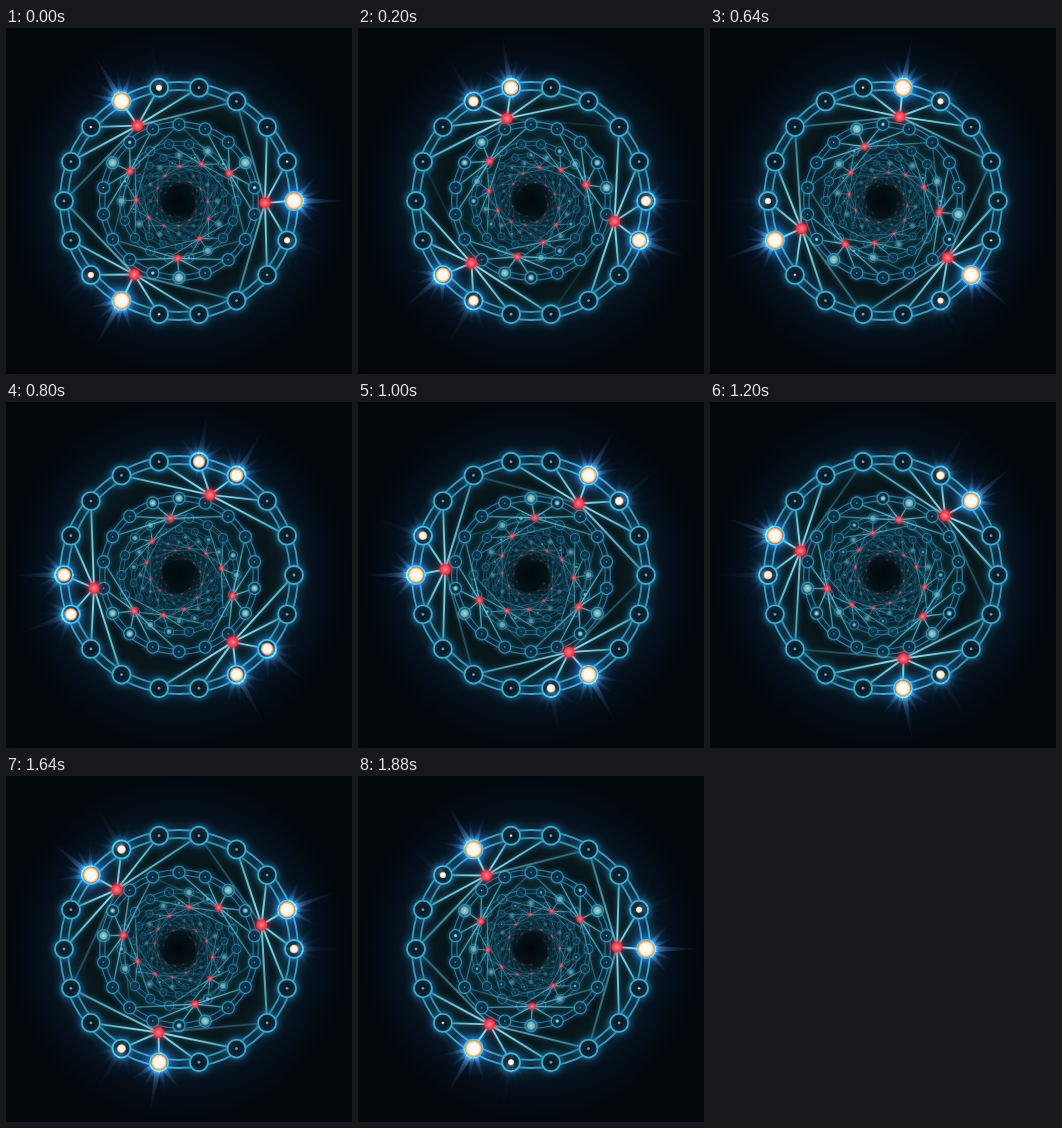
An HTML page with a canvas that plays this animation: 346x346 px, repeating every 1.92 s.

```html
<!DOCTYPE html>
<html lang="en">
<head>
<meta charset="utf-8">
<title>Ring tunnel</title>
<style>
html, body { margin: 0; width: 100%; height: 100%; overflow: hidden; background: #02070b; }
canvas { display: block; width: 100vw; height: 100vh; }
</style>
</head>
<body>
<canvas id="stage" width="346" height="346"></canvas>
<script>
const SIZE = 346, LOOP = 1920, STEP = 40, DEG = Math.PI / 180;
const LEVELS = 10, NODES = 18, RING = 115, HUB = 86;
const ctx = document.getElementById('stage').getContext('2d');

const clamp = v => Math.max(0, Math.min(1, v));
const polar = (r, deg) => [r * Math.cos(deg * DEG), r * Math.sin(deg * DEG)];
// Shortest angular distance to any of the three hubs.
const gap = (a, b) => { const d = (((a - b) % 360) + 360) % 360; return Math.min(d, 360 - d); };

function glow(color, blur) {
  ctx.shadowColor = color;
  ctx.shadowBlur = blur;
}

function disc(x, y, r, fill) {
  ctx.beginPath();
  ctx.arc(x, y, r, 0, 2 * Math.PI);
  ctx.fillStyle = fill;
  ctx.fill();
}

function circle(x, y, r, width, color) {
  ctx.beginPath();
  ctx.arc(x, y, r, 0, 2 * Math.PI);
  ctx.lineWidth = width;
  ctx.strokeStyle = color;
  ctx.stroke();
}

function radial(x, y, r, ...stops) {
  const g = ctx.createRadialGradient(x, y, 0, x, y, r);
  stops.forEach(([at, color]) => g.addColorStop(at, color));
  return g;
}

function spokes(hubs, scale) {
  const base = ctx.globalAlpha;
  ctx.lineWidth = 1.9;
  glow('#1684a8', 5 * scale);
  for (const hub of hubs) {
    const [hx, hy] = polar(HUB, hub);
    for (let i = 0; i < NODES; i++) {
      const angle = i * 20, fade = clamp((68 - gap(angle, hub)) / 14);
      if (!fade) continue;
      const [x, y] = polar(RING, angle);
      const g = ctx.createLinearGradient(hx, hy, x, y);
      g.addColorStop(0, '#a4e2e8');
      g.addColorStop(1, '#489fb1');
      ctx.globalAlpha = base * fade;
      ctx.strokeStyle = g;
      ctx.beginPath();
      ctx.moveTo(hx, hy);
      ctx.lineTo(x, y);
      ctx.stroke();
    }
  }
  ctx.globalAlpha = base;
}

function flare(x, y, angle, power) {
  ctx.save();
  ctx.globalCompositeOperation = 'lighter';
  ctx.translate(x, y);
  disc(0, 0, 30, radial(0, 0, 30, [0, `rgba(70,150,235,${.65 * power})`],
    [.4, `rgba(28,80,150,${.4 * power})`], [1, 'rgba(0,10,40,0)']));
  ctx.rotate(angle * DEG);
  for (const [turn, length, width] of [[0, 58, 3.5], [-48, 38, 3], [48, 38, 3], [-22, 34, 3], [22, 34, 3], [180, 24, 2]]) {
    ctx.save();
    ctx.rotate(turn * DEG);
    ctx.fillStyle = radial(0, 0, length, [0, `rgba(150,190,220,${.6 * power})`],
      [.4, `rgba(65,105,145,${.35 * power})`], [1, 'rgba(10,25,50,0)']);
    ctx.beginPath();
    ctx.moveTo(0, -width);
    ctx.lineTo(length, 0);
    ctx.lineTo(0, width);
    ctx.fill();
    ctx.restore();
  }
  ctx.restore();
}

function node(angle, power, level, scale) {
  const [x, y] = polar(RING, angle);
  glow('#1478b8', 7 * scale);
  disc(x, y, 9, '#03131c');
  circle(x, y, 9, 1.8, '#49a9bd');
  glow('transparent', 0);
  disc(x, y, 1.4, '#7f979b');
  if (!power) return;
  if (!level) flare(x, y, angle, power);
  const r = 10 * Math.sqrt(power);
  disc(x, y, r, level
    ? radial(x, y, r, [0, '#e0ffff'], [.5, '#9cecf2'], [1, 'rgba(50,170,190,0)'])
    : radial(x, y, r, [0, '#ffffff'], [.6, '#fff5e4'], [.8, '#e9ae78'], [1, 'rgba(150,80,40,0)']));
}

function layer(level, phase) {
  const scale = 2 / (level + 2);
  const hubs = [0, 120, 240].map(a => a + phase);
  ctx.save();
  ctx.rotate(-30 * level * DEG);
  ctx.scale(scale, scale);
  ctx.globalAlpha = level ? .72 * .78 ** (level - 1) : 1;
  glow('#1670c0', 8 * scale);
  circle(0, 0, 119, 1.8, '#3f9fb4');
  circle(0, 0, 111, 1.8, '#3a93a5');
  spokes(hubs, scale);
  for (let i = 0; i < NODES; i++) {
    const near = Math.min(...hubs.map(h => gap(i * 20, h)));
    node(i * 20, clamp(1 - near / 21.5), level, scale);
  }
  glow('#ff2038', 6 * scale);
  for (const hub of hubs) {
    const [x, y] = polar(HUB, hub);
    disc(x, y, 5.5, radial(x, y, 5.5, [0, '#ff929c'], [.5, '#ff4c5c'], [1, '#d82f42']));
  }
  ctx.restore();
}

function draw(time) {
  ctx.fillStyle = '#02070b';
  ctx.fillRect(0, 0, SIZE, SIZE);
  ctx.save();
  ctx.translate(173, 173);
  disc(0, 0, 170, radial(0, 0, 170, [0, '#02080c'], [.12, '#04141a'], [.35, '#0a252b'],
    [.5, '#071419'], [.68, '#0b1d22'], [.8, '#04101c'], [1, '#02070b']));
  for (let level = LEVELS - 1; level >= 0; level--) layer(level, (time + STEP / 2) / LOOP * 120);
  ctx.restore();
}

const start = performance.now();
let shown = -1;
function tick() {
  const time = Math.floor((performance.now() - start) % LOOP / STEP) * STEP;
  if (time !== shown) draw(shown = time);
  requestAnimationFrame(tick);
}
tick();
</script>
</body>
</html>
```
